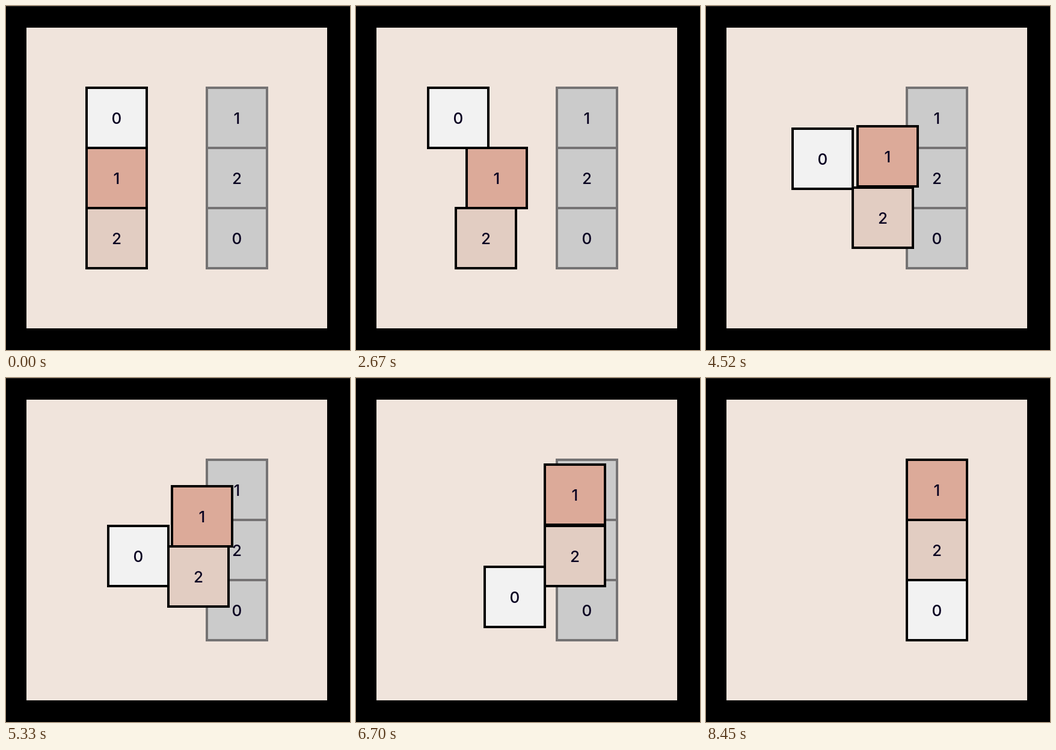
These frames come from a looping animation (572x572 px, 9.09 s). An HTML page:

```html
<!DOCTYPE html>
<html lang="en">
<head>
<meta charset="utf-8">
<title>Sliding blocks</title>
<style>
  html, body { margin: 0; width: 100%; height: 100%; overflow: hidden; background: #000; }
  svg { display: block; width: 100%; height: 100%; }
  rect { shape-rendering: crispEdges; }
  text { font: 500 26px Inter, "Open Sans", sans-serif; fill: #0a0322; text-anchor: middle; }
</style>
</head>
<body>
<svg viewBox="0 0 572 572">
  <rect width="572" height="572" fill="#000"/>
  <rect width="572" height="1" fill="#2a2a2a"/>
  <rect x="34" y="36" width="500" height="500" fill="#f0e4dc"/>
  <g id="stage"></g>
</svg>
<script>
const LOOP = 9090;
const SIZE = 100;
const STEP = 2;                      // blocks move in whole steps
const LEFT = 184, RIGHT = 384;       // column centres
const row = i => 186 + SIZE * i;     // row centres

// Moments, in ms: first move, blocks free to change rows, rows reached, columns reached.
const GO = 1910, FREE = 3150, LEVEL = 7050, DONE = 7750;
const LAST_LEVEL = 7130, LAST_DONE = 8450;

const stage = document.getElementById('stage');

function add(parent, tag, attrs) {
  const el = document.createElementNS('http://www.w3.org/2000/svg', tag);
  for (const key in attrs) el.setAttribute(key, attrs[key]);
  return parent.appendChild(el);
}

// A labelled square whose origin is its centre.
function makeBlock(label, fill, stroke) {
  const g = add(stage, 'g', {});
  add(g, 'rect', { x: -SIZE / 2, y: -SIZE / 2, width: SIZE, height: SIZE, fill, stroke, 'stroke-width': 4 });
  add(g, 'text', { x: 0, y: 10 }).textContent = label;
  return g;
}

function place(el, x, y) {
  el.setAttribute('transform', `translate(${x} ${y})`);
}

// Steady travel between [ms, value] points, holding the first and last value.
function glide(t, ...points) {
  const i = points.findIndex(p => p[0] > t);
  if (i < 1) return points.at(i)[1];
  const [t0, a] = points[i - 1], [t1, b] = points[i];
  return a + (b - a) * (t - t0) / (t1 - t0);
}

const snap = v => Math.round(v / STEP) * STEP;

// Block 0 backs away, then descends against the side of block 2 and slides under it.
const x1 = t => glide(t, [GO, LEFT], [FREE, 264], [LEVEL, 374], [DONE, RIGHT]);
const x2 = t => glide(t, [GO, LEFT], [4520, 294], [7000, 374], [DONE, RIGHT]);
const x0 = t => Math.max(
  glide(t, [GO, LEFT], [3040, 164], [FREE, 164], [4520, 194], [LAST_LEVEL, 275], [LAST_DONE, RIGHT]),
  x2(t) - SIZE);

const y0 = t => glide(t, [FREE, row(0)], [LAST_LEVEL, row(2)]);
const y1 = t => glide(t, [FREE, row(1)], [LEVEL, row(0)]);
const y2 = t => glide(t, [FREE + 30, row(2)], [LEVEL, row(1)]);

['1', '2', '0'].forEach((label, i) => place(makeBlock(label, '#cbcbcb', '#757374'), RIGHT, row(i)));

const blocks = [
  { el: makeBlock('0', '#f2f2f2', '#000'), x: x0, y: y0 },
  { el: makeBlock('1', '#dcaa99', '#000'), x: x1, y: y1 },
  { el: makeBlock('2', '#e2cdc2', '#000'), x: x2, y: y2 }
];

const start = performance.now();

function draw() {
  const t = (performance.now() - start) % LOOP;
  for (const b of blocks) place(b.el, snap(b.x(t)), snap(b.y(t)));
  requestAnimationFrame(draw);
}
draw();
</script>
</body>
</html>
```
